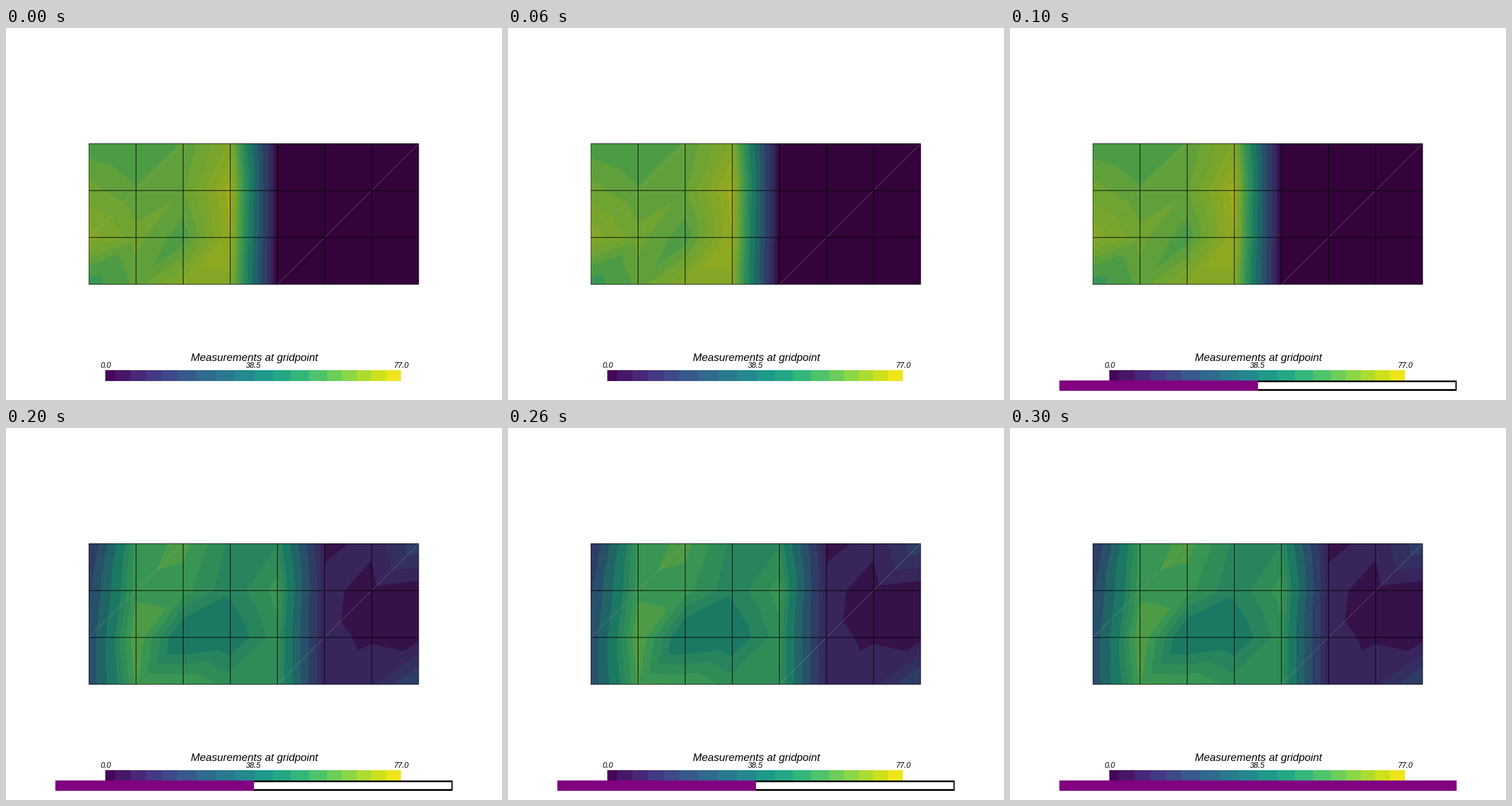
These frames come from a looping animation (864x648 px, 0.4 s). A matplotlib script:

```python
import numpy as np
import matplotlib.pyplot as plt
from matplotlib.animation import FuncAnimation
from matplotlib.colors import LinearSegmentedColormap
from matplotlib.patches import Rectangle
from matplotlib.tri import Triangulation

W, H, DPI = 864, 648, 100
PT = 72 / DPI
COLS, ROWS, BANDS = 8, 4, 18
xs = np.linspace(144.5, 719, COLS)
ys = np.linspace(201.5, 446.5, ROWS)
row, col = np.mgrid[:ROWS, :COLS]

fig = plt.figure(figsize=(W / DPI, H / DPI), dpi=DPI, facecolor="white")
ax = fig.add_axes([0, 0, 1, 1])
ax.set_autoscale_on(False)
ax.set_xlim(0, W)
ax.set_ylim(H, 0)
ax.axis("off")


def box(x0, y0, x1, y1, color, z=1):
    rect = Rectangle((x0, y0), x1 - x0, y1 - y0, fc=color, lw=0,
                     zorder=z, antialiased=False)
    return ax.add_patch(rect)


def line(x, y, color="black", width=1.0, alpha=1.0):
    ax.plot(x, y, color=color, lw=width * PT, alpha=alpha, snap=False,
            solid_capstyle="butt", zorder=3)


def label(x, y, text, size):
    ax.text(x, y, text, fontsize=size * PT, family="Liberation Sans",
            style="italic", ha="center", va="baseline", zorder=4)


def mesh():
    """Split every cell along its rising diagonal."""
    gx, gy = np.meshgrid(xs, ys)
    tris = []
    for r in range(ROWS - 1):
        for c in range(COLS - 1):
            tl = r * COLS + c
            bl = tl + COLS
            tris += [(tl, tl + 1, bl), (tl + 1, bl + 1, bl)]
    return Triangulation(gx.ravel(), gy.ravel(), tris)


def field(profile, bumps, tilt=0):
    """Column profile plus round bumps (row, column, height); 0 stays 0."""
    profile = np.array(profile)
    z = profile + tilt * (row - (ROWS - 1) / 2)
    for r, c, height in bumps:
        z = z + height * np.exp(-((row - r) ** 2 + (col - c) ** 2) / .62)
    return np.where(profile > 0, z, 0)


def band_edges(keys, values):
    """Inner band edges, spaced evenly between a few key bands."""
    return np.interp(range(BANDS - 1), keys, values)


first = field([.725, .755, .80, .845, 0, 0, 0, 0],
              [(1.75, .2, .17), (3, 0, -.07), (.3, 1.5, -.09),
               (2.1, 2, -.11), (3, 2, .08), (1.5, 3, .11)])
second = field([.28, .675, .735, .645, .61, .085, .11, .255],
               [(2, 2.3, -.34), (2, 1, .085), (.6, 3.2, -.09),
                (1, 4, .09), (1.48, 7, -.3), (0, -.5, -.13)], tilt=.01)

# Shaded surface colours
shade = LinearSegmentedColormap.from_list("shade", [
    (0, "#340039"), (.11, "#37255c"), (.31, "#294c6a"), (.5, "#1a7763"),
    (.68, "#3a9652"), (.79, "#6ea332"), (1, "#b2ad0c")])
levels = np.r_[-.01, band_edges([0, 3, 7, 11, 16],
                                [.03, .19, .55, .745, .90]), 1]
colors = shade((levels[:-1] + levels[1:]) / 2)

tri = mesh()
maps = [ax.tricontourf(tri, z.ravel(), levels=levels, colors=colors,
                       antialiased=False, zorder=2)
        for z in (first, second)]

# Seams and grid lines
for a, b, bottom in ((0, 2, 2), (4, 7, 3)):
    line([xs[a], xs[b]], [ys[bottom], ys[0]], "#b0b0b0", .8, .4)
for x in xs:
    line([x, x], [ys[0], ys[-1]], alpha=.6 if x in xs[[0, -1]] else 1)
for y in ys:
    line([xs[0], xs[-1]], [y, y], alpha=.8 if y in ys[[0, -1]] else 1)

# Colour scale
BAR_X, BAR_W = 173, 515
edges = np.r_[0, band_edges([0, 4, 8, 12, 16],
                            [.033, .243, .505, .75, .95]), 1]
for a, b in zip(edges, edges[1:]):
    box(round(BAR_X + BAR_W * a), 596, round(BAR_X + BAR_W * b), 615,
        plt.cm.viridis((a + b) / 2))
label(432.3, 580, "Measurements at gridpoint", 18.75)
for part in (0, .5, 1):
    label(BAR_X + .3 + BAR_W * part, 592, f"{77 * part:.1f}", 13.5)

# Progress bar
LEFT, RIGHT, TOP, BOTTOM = 86, 778, 614, 632
border = box(LEFT, TOP, RIGHT, BOTTOM, "black", 5)
inside = box(LEFT + 2, TOP + 3, RIGHT - 2, BOTTOM - 3, "white", 6)
fill = box(LEFT, TOP, LEFT, BOTTOM, "#800080", 7)


def update(i):
    for k, surface in enumerate(maps):
        surface.set_visible(k == i // 2)
    done = (i + 1) // 2 / 2
    fill.set_width((RIGHT - LEFT) * done)
    for part in (border, inside, fill):
        part.set_visible(done > 0)
    return [*maps, border, inside, fill]


anim = FuncAnimation(fig, update, frames=4, interval=100, repeat=True,
                     repeat_delay=0, blit=False)
plt.show()
```
